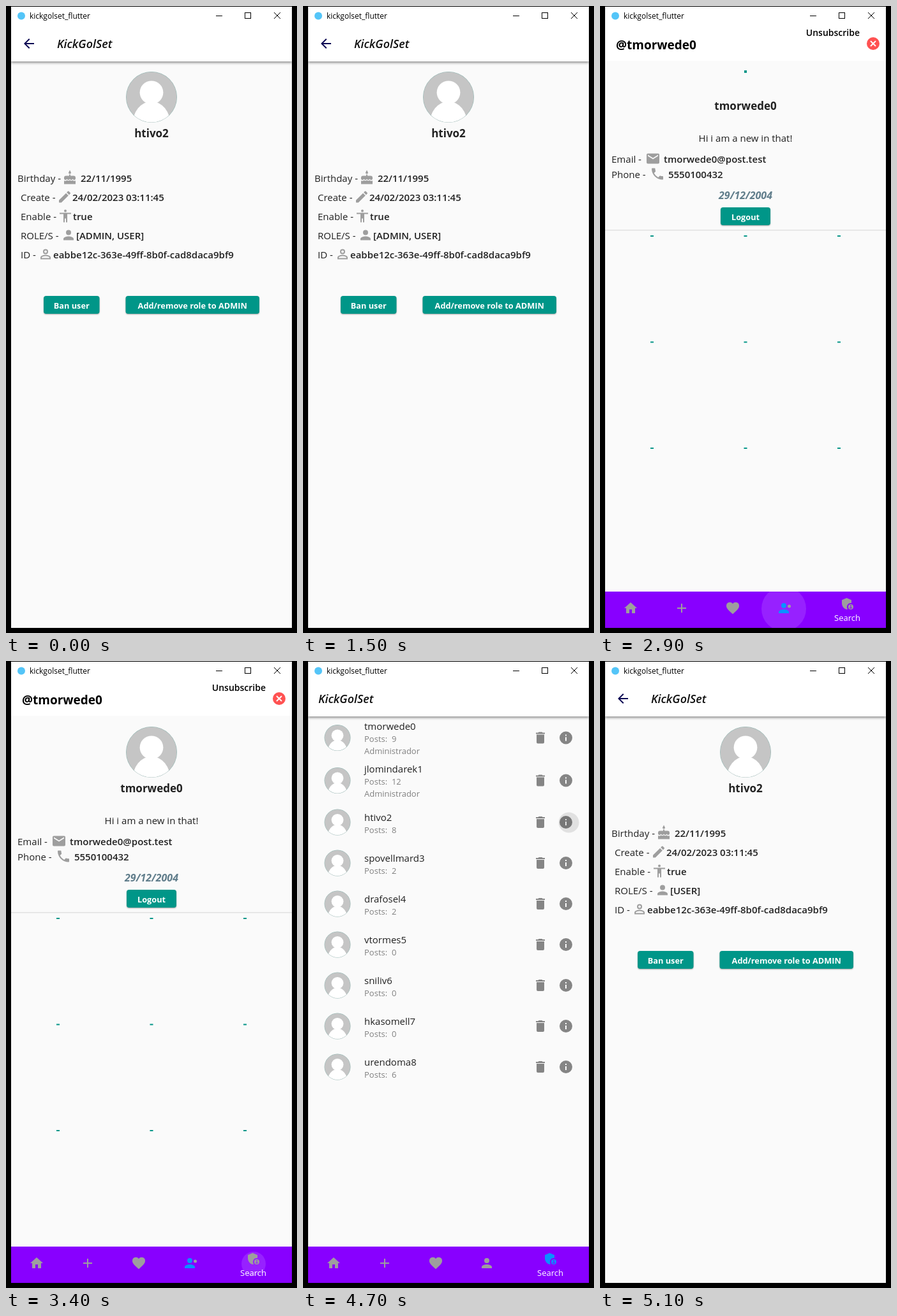
These frames come from a looping animation (456x984 px, 6.3 s). An HTML page with a canvas:

```html
<!DOCTYPE html>
<html lang="en">
<head>
<meta charset="utf-8">
<title>kickgolset_flutter</title>
<style>
  html, body { margin: 0; width: 100%; height: 100%; overflow: hidden; background: #000; }
  canvas { display: block; }
</style>
</head>
<body>
<canvas id="stage" width="456" height="984"></canvas>
<script>
const ctx = document.getElementById("stage").getContext("2d");
const LOOP = 6300, STEP = 100;
const TEAL = "#009688", GRAY = "#9e9e9e", PURPLE = "#8800ff", BLUE = "#0a91ff", PAPER = "#fafafa", INK = "#212121";
const APP = "KickGolSet", MEMBER = "htivo2", ME = "tmorwede0";
const USERS = [[ME, 9], ["jlomindarek1", 12], [MEMBER, 8], ["spovellmard3", 2], ["drafosel4", 2],
  ["vtormes5", 0], ["sniliv6", 0], ["hkasomell7", 0], ["urendoma8", 6]];

// Icons are drawn on a 24 unit grid.
const ICONS = {
  back: "M20 11H7.8l5.6-5.6L12 4l-8 8 8 8 1.4-1.4L7.8 13H20z",
  home: "M10 20v-6h4v6h5v-8h3L12 3 2 12h3v8z",
  plus: "M19 13h-6v6h-2v-6H5v-2h6V5h2v6h6z",
  heart: "M12 21.3l-1.5-1.3C5.4 15.4 2 12.3 2 8.5A5.5 5.5 0 0 1 12 5.1 5.5 5.5 0 0 1 22 8.5c0 3.8-3.4 6.9-8.5 11.5z",
  person: "M12 4a4 4 0 0 1 0 8a4 4 0 0 1 0-8zM4 20v-2c0-2.7 5.3-4 8-4s8 1.3 8 4v2z",
  outline: "M12 5a3 3 0 0 1 0 6a3 3 0 0 1 0-6zM5 19v-2c0-1.8 4-3 7-3s7 1.2 7 3v2z",
  shield: "M17 11l1 .1V6.3L10.5 3 3 6.3v4.9c0 4.5 3.2 8.8 7.5 9.8l1.6-.5A6 6 0 0 1 17 11zM17 13a4 4 0 0 1 0 8a4 4 0 0 1 0-8zM17 14.4a1.1 1.1 0 0 1 0 2.2a1.1 1.1 0 0 1 0-2.2zM14.8 18.6a2.7 2.7 0 0 0 4.4 0q-2.2-2-4.4 0z",
  cake: "M12 0l2 4a2 2 0 0 1-4 0zM11 7h2v2h5a3 3 0 0 1 3 3v2q-2 3-4.5 0q-2.2 3-4.5 0q-2.2 3-4.5 0q-2.5 3-4.5 0v-2a3 3 0 0 1 3-3h5zM3 16.4q3 1.4 4.5-.6q2 2 4.5 0q2.5 2 4.5 0q1.5 2 4.5.6V22H3z",
  pencil: "M3 17.2V21h3.8L17.8 9.9l-3.7-3.7zM20.7 7q.7-.7 0-1.4l-2.3-2.3q-.7-.7-1.4 0l-1.9 1.8 3.8 3.8z",
  figure: "M12 2a2 2 0 0 1 0 4a2 2 0 0 1 0-4zM21 9h-6v13h-2v-6h-2v6H9V9H3V7h18z",
  trash: "M6 7h12v12a2 2 0 0 1-2 2H8a2 2 0 0 1-2-2zM19 4h-3.5l-1-1h-5l-1 1H5v2h14z",
  info: "M12 2a10 10 0 0 1 0 20a10 10 0 0 1 0-20zM11 11h2v6h-2zM11 7h2v2h-2z",
  mail: "M4 4h16a2 2 0 0 1 2 2v12a2 2 0 0 1-2 2H4a2 2 0 0 1-2-2V6a2 2 0 0 1 2-2zM20 8V6l-8 5-8-5v2l8 5z",
  phone: "M6.6 10.8a15 15 0 0 0 6.6 6.6l2.2-2.2q.5-.5 1-.3 1.7.6 3.6.6 1 0 1 1V20q0 1-1 1A17 17 0 0 1 3 4q0-1 1-1h3.5q1 0 1 1 0 1.9.6 3.6.2.5-.3 1z",
};
for (const name in ICONS) ICONS[name] = new Path2D(ICONS[name]);

const clamp = (v, lo = 0, hi = 1) => Math.min(hi, Math.max(lo, v));

function rect(x, y, w, h, color) {
  ctx.fillStyle = color;
  ctx.fillRect(x, y, w, h);
}

function circle(x, y, r, color) {
  ctx.fillStyle = color;
  ctx.beginPath();
  ctx.arc(x, y, r, 0, 7);
  ctx.fill();
}

function cross(x, y, r, color, width) {
  ctx.strokeStyle = color;
  ctx.lineWidth = width;
  ctx.beginPath();
  ctx.moveTo(x - r, y - r); ctx.lineTo(x + r, y + r);
  ctx.moveTo(x + r, y - r); ctx.lineTo(x - r, y + r);
  ctx.stroke();
}

// y is the middle of the capital letters.
function text(str, x, y, size, { weight = 400, color = INK, align = "left", italic = false } = {}) {
  ctx.font = `${italic ? "italic " : ""}${weight} ${size}px "Open Sans", "Noto Sans", sans-serif`;
  ctx.textAlign = align;
  ctx.fillStyle = color;
  ctx.fillText(str, x, y + size * 0.36);
}

function icon(name, x, y, color = GRAY) {
  ctx.save();
  ctx.translate(x - 12, y - 12);
  ctx.fillStyle = ctx.strokeStyle = color;
  ctx.lineWidth = 2;
  if (name === "outline") ctx.stroke(ICONS[name]);
  else ctx.fill(ICONS[name], "evenodd");
  ctx.restore();
}

function withShadow(blur, offset, alpha, draw) {
  ctx.save();
  ctx.shadowColor = `rgba(0,0,0,${alpha})`;
  ctx.shadowBlur = blur;
  ctx.shadowOffsetY = offset;
  draw();
  ctx.restore();
}

function avatar(x, y, r) {
  circle(x, y, r, "#8fb5b1");
  ctx.save();
  ctx.beginPath();
  ctx.arc(x, y, r - 0.5, 0, 7);
  ctx.clip();
  rect(x - r, y - r, 2 * r, 2 * r, "#c5c5c5");
  circle(x, y - r * 0.18, r * 0.46, "#fff");
  ctx.fillStyle = "#fff";
  ctx.beginPath();
  ctx.ellipse(x, y + r * 1.07, r * 0.74, r * 0.9, 0, 0, 7);
  ctx.fill();
  ctx.restore();
}

function button(label, x, y, w, hover = 0, ripple = -1) {
  const shape = new Path2D();
  shape.roundRect(x, y, w, 28, 4);
  ctx.fillStyle = TEAL;
  withShadow(2 + hover, 1 + hover / 2, 0.35, () => ctx.fill(shape));
  ctx.save();
  ctx.clip(shape);
  rect(x, y, w, 28, `rgba(255,255,255,${0.08 * hover})`);
  if (ripple >= 0) circle(x + w / 2, y + 14, 20 + w * 0.7 * ripple, `rgba(255,255,255,${0.24 * clamp(2.5 - 2.5 * ripple)})`);
  ctx.restore();
  text(label, x + w / 2, y + 15, 12.75, { weight: 700, color: "#fff", align: "center" });
}

function appBar(titleX) {
  withShadow(4, 2, 0.45, () => rect(8, 31, 440, 56, "#fff"));
  text(APP, titleX, 60, 18, { weight: 600, color: "#111", italic: true });
}

function portrait(name, loaded) {
  if (loaded) avatar(228, 143, 40);
  else rect(226, 101, 4, 4, TEAL);
  text(name, 228, loaded ? 200 : 157, 17, { weight: 700, align: "center" });
}

function field(label, x, y, iconName, iconX, value, valueX) {
  text(label + " -", x, y, 15);
  icon(iconName, iconX, y - 1.5);
  text(value, valueX, y, 15, { weight: 600 });
}

function detailPage(t, roles, loaded) {
  rect(8, 31, 440, 945, PAPER);
  appBar(80);
  if (t >= 1800 && t < 2100) circle(36, 59, 12 + (t - 1800) / 25, "rgba(0,0,0,.08)");
  icon("back", 36, 59, "#0b0752");
  portrait(MEMBER, loaded);
  const dy = loaded ? 0 : -43;
  field("Birthday", 18, 271 + dy, "cake", 100, "22/11/1995", 117);
  field("Create", 23, 301 + dy, "pencil", 92, "24/02/2023 03:11:45", 104);
  field("Enable", 23, 331 + dy, "figure", 93, "true", 105);
  field("ROLE/S", 23, 361 + dy, "person", 98, roles, 110);
  field("ID", 23, 391 + dy, "outline", 62, "eabbe12c-363e-49ff-8b0f-cad8daca9bf9", 74);
  const hover = t >= 600 && t < 1500 ? clamp((t - 500) / 300) : 0;
  const ripple = t >= 1000 && t < 1500 ? (t - 1000) / 500 : -1;
  button("Ban user", 59, 455 + dy, 87.5);
  button("Add/remove role to ADMIN", 187.5, 455 + dy, 209.5, hover, ripple);
}

function navRipple(x, t, start) {
  const age = t - start;
  if (age < 0 || age >= 500) return;
  circle(x, 946, clamp(11 + age / 12.5, 0, 35), `rgba(255,255,255,${0.13 * clamp((500 - age) / 200)})`);
}

function navBar(t, profile) {
  ctx.save();
  ctx.beginPath();
  ctx.rect(8, 919, 440, 57);
  ctx.clip();
  rect(8, 919, 440, 57, PURPLE);
  navRipple(288, t, 2600);
  navRipple(388, t, 3300);
  icon("home", 48, 945);
  icon("plus", 128, 945);
  icon("heart", 208, 945);
  icon("person", 288, 945, profile ? BLUE : GRAY);
  if (profile) circle(296.5, 942, 2.5, GRAY);
  icon("shield", 388, 938, profile ? GRAY : BLUE);
  text("Search", 387.5, 960.5, 13, { color: "#fff", align: "center" });
  ctx.restore();
}

function listPage(t, admins) {
  rect(8, 31, 440, 945, PAPER);
  appBar(24);
  let top = 87;
  USERS.forEach(([name, posts], i) => {
    const admin = i < admins, height = admin ? 67 : 64, y = top + height / 2;
    const muted = { color: "#808080" };
    avatar(54, y, 20.5);
    text(name, 96, y - (admin ? 17.5 : 7.5), 15);
    text("Posts:  " + posts, 96, y + (admin ? 1.5 : 12), 13, muted);
    if (admin) text("Administrador", 96, y + 20.5, 13, muted);
    icon("trash", 372, y, "#858585");
    icon("info", 412, y, "#858585");
    top += height;
  });
  if (t >= 4500 && t < 4900) circle(416.5, 253.5, t < 4700 ? 7.5 : 16, "rgba(0,0,0,.1)");
  navBar(t, false);
}

function profilePage(t) {
  const loaded = t >= 3000, dy = loaded ? 43 : 0;
  rect(8, 31, 440, 945, PAPER);
  rect(8, 31, 440, 55, "#fff");
  text("@" + ME, 25, 61, 19, { weight: 700, color: "#000" });
  text("Unsubscribe", 407, 42, 14, { weight: 600, color: "#000", align: "right" });
  circle(428, 59, 10, "#ff5252");
  cross(428, 59, 4, "#fff", 2);
  portrait(ME, loaded);
  text("Hi i am a new in that!", 228, 208 + dy, 15, { align: "center" });
  field("Email", 18, 241 + dy, "mail", 83, ME + "@post.test", 100);
  field("Phone", 18, 265 + dy, "phone", 90, "5550100432", 107);
  text("29/12/2004", 228, 297 + dy, 16, { weight: 700, color: "#607d8b", align: "center", italic: true });
  button("Logout", 189, 316 + dy, 78);
  rect(8, 351 + dy, 440, 1.5, "#e2e2e2");
  for (let i = 0; i < 9; i++) {
    rect(79 + (i % 3) * 146.5, 360 + dy + Math.floor(i / 3) * 166.5, 5, 2, TEAL);
  }
  navBar(t, true);
}

function windowFrame() {
  rect(0, 0, 456, 984, "#000");
  rect(8, 1, 440, 975, "#fff");
  circle(24, 15.5, 6, "#54c5f8");
  text("kickgolset_flutter", 37, 16, 12, { color: "#000" });
  rect(329, 15, 10, 1, "#000");
  ctx.strokeStyle = "#000";
  ctx.lineWidth = 1;
  ctx.strokeRect(374.5, 10.5, 9, 9);
  cross(425, 15, 5, "#000", 1);
}

function zoomed(scale, draw) {
  ctx.save();
  ctx.translate(228, 503.5);
  ctx.scale(scale, scale);
  ctx.translate(-228, -503.5);
  ctx.beginPath();
  ctx.rect(8, 31, 440, 945);
  ctx.clip();
  draw();
  ctx.restore();
}

function openDetail(t) {
  const p = clamp((t - 4700) / 300), rest = (1 - p) ** 1.8;
  zoomed(1 + 0.05 * (1 - rest), () => listPage(t, 2));
  rect(8, 31, 440, 945, `rgba(0,0,0,${clamp(0.8 * p, 0, 0.6)})`);
  zoomed(1 - 0.15 * rest, () => detailPage(t, "[USER]", t >= 5100));
}

function render(t) {
  windowFrame();
  ctx.save();
  ctx.beginPath();
  ctx.rect(8, 31, 440, 945);
  ctx.clip();
  if (t < 2100) detailPage(t, "[ADMIN, USER]", true);
  else if (t < 2800) zoomed(1 + 0.031 * (1 - clamp((t - 2100) / 300)) ** 3, () => listPage(t, 3));
  else if (t < 3500) profilePage(t);
  else if (t < 4800) listPage(t, 2);
  else openDetail(t);
  ctx.restore();
}

const start = performance.now();
function tick() {
  const t = (performance.now() - start) % LOOP;
  render(Math.floor(t / STEP) * STEP);
  requestAnimationFrame(tick);
}
tick();
</script>
</body>
</html>
```
